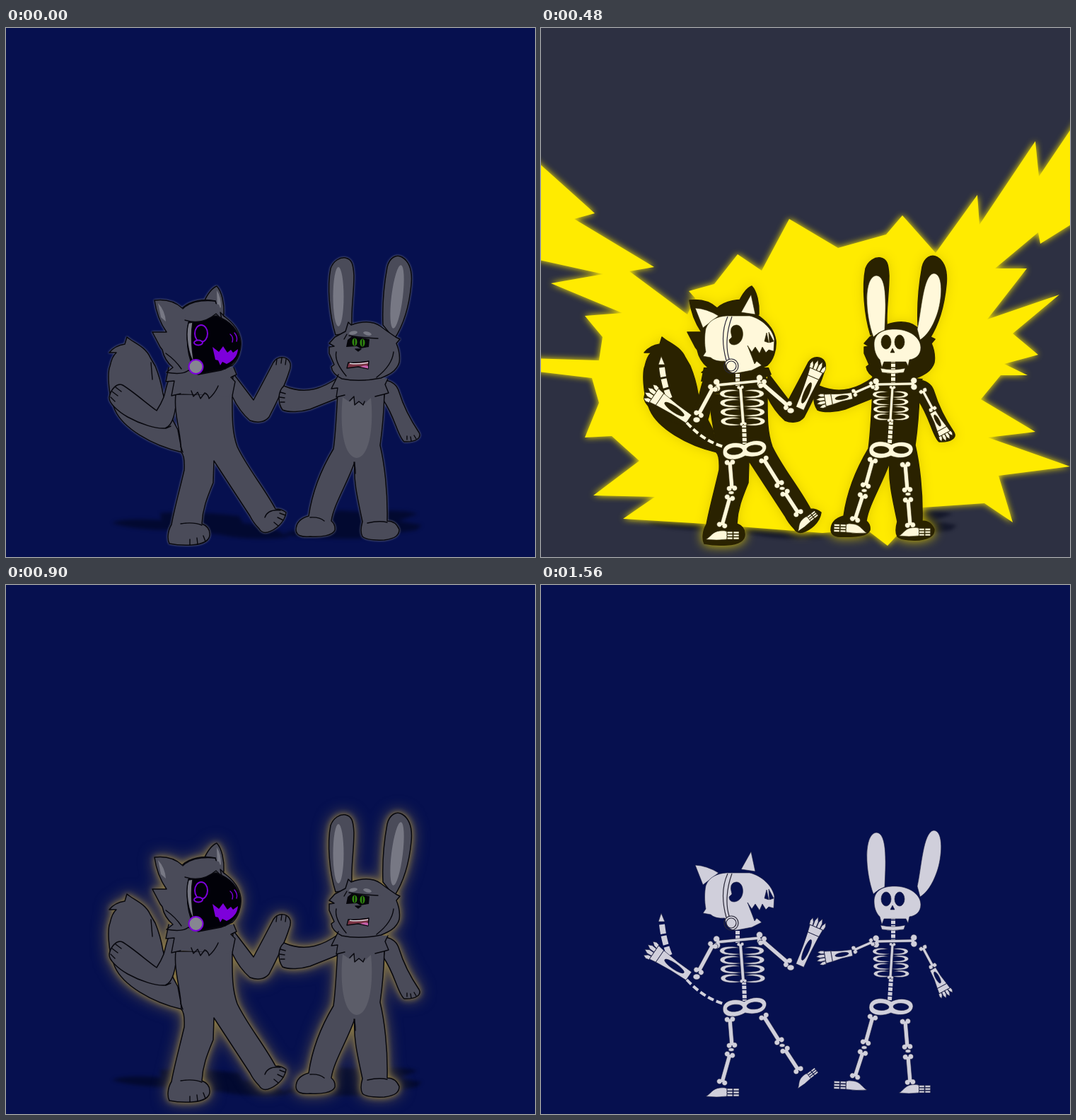
An HTML page that plays this animation: 748 px wide and 748 px high, repeating every 1.62 s.

```html
<!DOCTYPE html>
<html lang="en">
<head>
<meta charset="utf-8">
<title>Shocking handshake</title>
<style>
html, body { margin: 0; height: 100%; overflow: hidden; background: #06104f; }
svg { display: block; width: 748px; height: 748px; background: #06104f; }
.burst, .skel #shadow, .skel #bodies, #bones, #details { display: none; }
.burst { fill: #ffeb00; filter: drop-shadow(0 0 5px #ffeb00); }
.a, .b { background: #2d3042; }
.a #burstA, .b #burstB { display: inline; }
.calm #details, .glow #details { display: inline; }
.white #bones, .dark #bones, .shade #bones, .skel #bones { display: inline; }

.calm, .glow { --body: #4a4b59; --line: #07070d; }
.white { --body: #fff8da; --line: #fff8da; --bone: #2a2200; --edge: #fff8da; }
.dark { --body: #2a2200; --line: #2a2200; --bone: #fff8da; --edge: #2a2200; }
.shade { --body: #2a2200; --line: #2a2200; --bone: #2a2200; --edge: #5d5433; }
.skel { --bone: #d0cfdb; --edge: #15183c; }

#bodies { fill: var(--body); stroke: var(--line); stroke-width: 1.5; stroke-linejoin: round; }
.calm #bodies { filter: drop-shadow(0 0 1.5px #777a86); }
.glow #bodies { filter: drop-shadow(0 0 4px #8f7c45) drop-shadow(0 0 10px #6b6046); }
.a #bodies, .b #bodies { filter: drop-shadow(0 0 8px #dfc900); }
#bodies .fur { stroke: none; }
#details { fill: none; stroke: #07070d; stroke-width: 1.4; stroke-linecap: round; stroke-linejoin: round; }
#bones { fill: var(--bone); stroke: var(--edge); stroke-width: .6; fill-rule: evenodd; }
#bones .links { fill: none; stroke: var(--bone); }
#bones .seam { fill: none; stroke: var(--edge); stroke-width: 1.2; }
.dark #bones .seam, .skel #bones .seam { stroke: #2a2838; }
</style>
</head>
<body>
<svg id="stage" class="calm" viewBox="0 0 748 748">
  <path id="shadow" fill="#000418" opacity=".55" style="filter:blur(2.5px)" d="M150 700Q165 692 220 696L218 686Q260 682 330 690L335 700Q380 704 400 720Q350 726 300 716L240 710Q180 710 150 700ZM390 716Q420 722 500 722L580 710 588 703 555 697 582 687Q560 680 500 684L470 682 440 700Z"/>

  <path id="burstA" class="burst" d="M-20 176L76 262 47 270 160 338 125 344 207 405 218 382 209 372 245 362 278 320 312 343 351 270 420 311 488 292 511 265 558 318 617 236 620 278 699 160 704 210 770 112V265L706 305 703 289 642 340H687L631 412 733 377 667 432 703 462 655 475 688 491H650L622 525 699 571 632 579 748 620 647 633 667 699 627 672 540 678 490 732 460 709 398 714 215 700 116 694 161 663 74 661 139 612 100 577 62 579 82 530 72 495-20 484V467L82 470 87 437 62 407 115 403 14 361 88 348-20 324Z"/>
  <path id="burstB" class="burst" d="M-20 173L55 237 36 251 135 302 108 318 196 382 215 380 260 289 320 369 405 361 424 338 450 366 495 376 529 340 548 360 575 350 606 318 593 297 680 222 672 203 770 85V232L708 263 724 297 630 345 640 374 611 406 618 430 742 438 652 472 712 470 659 522 671 558 655 549 665 573 721 604 627 612 640 640 684 653 571 671 590 748 530 698 470 692 405 722 330 697 300 755H270L230 728 187 710 205 704 69 730 118 628 32 558 143 518 46 486 140 484 155 462 108 390 143 387 36 358 96 339-20 318Z"/>

  <g id="bodies">
    <!-- fox -->
    <path d="M249 600C205 590 165 565 154 540C143 515 144 485 147 478Q150 464 156 459L146 459Q154 449 168 447L171 437C180 445 197 450 204 466L211 478C218 495 220 505 222 517Q229 543 243 568Z"/>
    <path d="M238 488C229 492 227 508 223 522Q219 532 213 541C200 532 180 514 165 505C157 501 148 511 146 522C145 530 158 542 172 550C190 560 212 567 225 566C236 562 240 545 242 515Z"/>
    <path d="M321 488L350 526Q364 500 378 473C384 463 397 464 401 472Q404 477 400 487C395 503 385 525 372 550C365 559 353 558 345 555Q330 542 320 521Z"/>
    <path d="M240 518C237 545 247 570 248 600Q253 605 252 625C245 655 238 680 234 702C228 712 228 724 231 729Q245 732 263 731C280 730 289 724 288 715C288 707 282 703 277 701C278 680 284 665 293 643L294 612 345 690Q350 700 358 708Q362 715 370 713C380 710 394 700 396 685Q390 680 381 680C365 650 340 620 327 592C319 570 320 545 320 518Z"/>
    <path class="fur" d="M230 480L226 500 238 499 234 520 250 517 320 521 324 500 318 494 326 490 322 480Z"/>
    <path d="M279 389Q288 369 298 365C305 372 309 390 308 405L295 408Z"/>
    <path d="M210 385Q234 382 249 396C260 386 280 382 296 386L301 402 309 408C320 416 330 428 332 442C333 456 328 470 320 477L304 484 272 490 258 484Q250 491 227 487L236 480Q224 470 221 455L218 451 207 430 227 430C218 417 212 400 210 385Z"/>
    <!-- rabbit -->
    <path d="M466 434C457 405 454 365 459 340C463 329 472 324 480 325C489 327 491 333 492 350C492 375 488 398 489 418L483 432Z"/>
    <path d="M533 420C532 395 534 365 539 338C542 325 552 319 560 324C570 330 575 343 573 363C570 395 562 420 549 440Z"/>
    <path d="M470 494C450 508 425 520 393 506C384 514 384 530 391 540C400 544 417 543 430 539L470 523Z"/>
    <path d="M537 498Q552 501 556 515C562 535 572 554 584 572C588 579 580 586 563 585C554 578 550 550 534 527Z"/>
    <path d="M469 515C467 550 466 575 463 595C445 625 433 655 428 690Q410 695 410 710Q411 721 430 719C445 720 462 718 465 710Q466 702 460 697C463 675 482 645 493 614C491 640 497 665 504 698Q500 712 504 719Q510 725 535 724C551 722 556 717 556 709Q551 697 539 697C540 655 535 615 529 590Q534 555 535 517Z"/>
    <path class="fur" d="M470 490L460 510 469 509 467 522 479 519 486 529 492 523 493 533 499 529 505 533 522 521 534 518 541 516 536 504 540 496Z"/>
    <path d="M484 416L488 420C505 414 520 415 530 422L538 428 551 437 557 440 552 446Q558 460 556 473C552 486 540 491 530 495Q500 501 475 496Q461 489 460 479L464 476 457 460V451L464 450 457 446 465 437 480 429Z"/>
  </g>

  <g id="details">
    <path d="M230 480L226 500 238 499 234 520 247 517M322 480L326 490 318 494 324 500 320 520M262 513L265 521 271 515 275 524 281 516Q286 518 287 524Q296 516 300 506M205 473L207 497M226 460Q240 470 248 482M150 514L158 520M155 508L163 514M148 522L154 528M383 468L382 476M390 466L389 474M396 468L395 476M247 701Q265 698 277 703M260 723V731M270 721L271 730M279 718L282 726M366 692Q370 680 388 682M384 692L392 696M379 699L385 704M387 686L395 689M226 566L233 563M247 592L250 600"/>
    <path d="M215 389Q225 400 226 415L219 409ZM298 371Q304 380 304 395L299 399Z" fill="#777884" stroke="none"/>
    <path d="M258 416Q252 455 266 483L272 489 310 482Q331 470 332 447Q328 418 297 407Z" fill="#010108"/>
    <path d="M258 417C253 435 258 462 266 474Q260 440 264 416Z" fill="#777884"/>
    <path d="M253 413Q277 421 297 404L307 407 301 391 280 387 255 397Z" fill="#4a4b59" stroke="none"/>
    <path d="M250 397Q264 383 296 386M253 413Q277 421 297 404L305 412 303 402 309 408"/>
    <g stroke="#7d00db" stroke-width="2">
      <ellipse cx="276" cy="432" rx="9" ry="12"/><ellipse cx="272" cy="445" rx="6" ry="3.5" fill="#010108"/>
      <path d="M317 433Q322 437 320 444M323 431Q328 437 326 443" stroke-width="1.4"/>
      <path d="M292 451L301 458 307 450 313 459 318 455 321 459 328 454Q327 468 312 475L306 472 303 477 300 470 296 469Z" fill="#7d00db" stroke="none"/>
      <circle cx="268.5" cy="479" r="10" fill="#868691"/>
    </g>

    <g fill="#777884" stroke="none">
      <ellipse cx="470" cy="380" rx="7.5" ry="42"/>
      <ellipse cx="553" cy="380" rx="8" ry="45" transform="rotate(7 553 380)"/>
      <ellipse cx="491" cy="431" rx="6" ry="2.5" transform="rotate(-10 491 431)"/>
      <ellipse cx="511" cy="432" rx="6" ry="2.5" transform="rotate(15 511 432)"/>
      <path d="M476 522L486 529 492 523 493 533 499 529 505 533 516 523C520 560 515 606 496 608C476 606 472 560 476 522Z" fill="#5c5d69"/>
    </g>
    <path d="M470 490L460 510 469 509 467 522 479 519M486 527L492 521 493 533 499 528 505 533 507 528M522 521L534 518 541 516 536 504 540 496M467 458Q464 472 481 492M548 458Q546 477 524 494M485 435Q505 438 526 439M478 440L482 433M388 515L395 517M387 522L394 523M388 529L394 529M567 582V577M573 584L572 578M580 581L577 576M430 692Q443 691 450 697M511 700Q528 696 539 699M492 614Q494 620 494 630"/>
    <path d="M481 451L483 441 489 436 514 440 513 451 501 453 496 450Z" fill="#05050a" stroke="none"/>
    <g fill="#30880f" stroke="none"><ellipse cx="493" cy="444" rx="3.5" ry="5.5"/><ellipse cx="504" cy="445" rx="3.5" ry="5.5"/></g>
    <path d="M493 440V448M504 441V449M494 454H502L498 457Z" fill="#05050a"/>
    <path d="M484 473Q498 474 513 471L512 482 498 479 482 481Z" fill="#7b3444"/>
    <path d="M486 473.500Q498 475 512 472.500V474Q498 476.500 486 475Z" fill="#ddd8de" stroke="none"/>
    <path d="M501 479Q507 476 512 478V481.500Z" fill="#c861ae" stroke="none"/>
  </g>

  <g id="bones"></g>
</svg>
<script>
const stage = document.getElementById('stage');
const path = (d, attrs = '') => `<path d="${d}" ${attrs}/>`;
const oval = (x, y, rx, ry) => `M${x - rx} ${y}a${rx} ${ry} 0 1 0 ${2 * rx} 0a${rx} ${ry} 0 1 0 ${-2 * rx} 0z`;

// Draws along the line from (x1,y1) to (x2,y2); shape(length) works on the local x axis.
const along = (x1, y1, x2, y2, shape) => {
  const angle = Math.atan2(y2 - y1, x2 - x1) * 180 / Math.PI;
  return path(shape(Math.hypot(x2 - x1, y2 - y1)), `transform="translate(${x1} ${y1}) rotate(${angle})"`);
};
const bone = (x1, y1, x2, y2, w = 3, r = 3.8) => along(x1, y1, x2, y2, n =>
  `M${r} ${-w}H${n - r}a${r} ${r} 0 1 1 ${r} ${w}a${r} ${r} 0 1 1 ${-r} ${w}H${r}a${r} ${r} 0 1 1 ${-r} ${-w}a${r} ${r} 0 1 1 ${r} ${-w}z`);

// Forearm from wrist to elbow, with a palm and fanned fingers beyond the wrist.
const forearm = (x1, y1, x2, y2, a, b, reach) => along(x1, y1, x2, y2, n => {
  const palm = -reach * .45;
  let d = `M0 ${-a}Q${n / 2} ${-b} ${n} ${-b}V${b}Q${n / 2} ${b} 0 ${a}z` + oval(n * .5, 0, n * .33, b * .6);
  d += `M0 ${-a}L${palm} ${-a * 1.15}V${a * 1.15}L0 ${a}z`;
  for (let i = 0; i < 4; i++) {
    const y = (i - 1.5) * a * .65, tip = -reach * (i % 3 ? 1.05 : .9);
    d += `M${palm} ${y - a * .28}L${tip * .75} ${y * 1.1 - a * .3}L${tip} ${y * 1.2}L${tip * .75} ${y * 1.1 + a * .3}L${palm} ${y + a * .28}z`;
  }
  return d;
});

const ribs = (x, y, scale, rows, gap) => {
  const half = 'M-1 5C-20 9-33 5-33 0C-33-6-15-8-4-4C-18-4-27-2-26 1C-24 4-12 4-1 5Z';
  let out = '';
  for (let i = 0; i < rows; i++)
    for (const side of [1, -1])
      out += path(half, `transform="translate(${x + i * .5} ${y + i * gap}) scale(${side * scale} ${scale})"`);
  return out;
};

const pelvis = (x, y, tilt) => path(
  'M0-8C12-15 31-13 31-2C30 9 15 13 0 8C-15 15-31 12-31 1C-31-12-13-15 0-8Z' + oval(-14, 0, 11, 5) + oval(14, -1, 11, 5),
  `transform="translate(${x} ${y}) rotate(${tilt})"`);

const foot = (x, y, turn, flip = 1, size = 1) => {
  let d = 'M0 0C7-3 9-11 20-12Q27-13 30-11V0Q15 2 0 0Z';
  for (let i = 0; i < 3; i++) d += `M30 ${-11 + i * 4}h8v3h-8zM39 ${-11 + i * 4}h8v3h-8z`;
  return path(d, `transform="translate(${x} ${y}) rotate(${turn}) scale(${flip * size} ${size})"`);
};

const links = (d, width, dash) => path(d, `class="links" stroke-width="${width}" stroke-dasharray="${dash}"`);
const seam = d => path(d, 'class="seam"');

const fox =
  path('M218 396Q235 397 251 407L229 424ZM297 377L303 405 283 402Z') +
  path('M233 425C238 412 250 408 262 407H295C312 411 327 425 330 440L329 457 322 455 318 459 313 451 309 460 303 451 298 458 292 449L299 467 302 475 305 471 312 477 298 484 277 488C268 489 262 484 260 471Q246 472 240 466L229 464 233 458C231 447 231 435 233 425Z' +
    'M276 420C289 420 289 447 273 448Q266 448 266 441L270 437Q265 421 276 420ZM319 431L316 443 322 445ZM322 430L329 443 323 445Z') +
  seam('M264 408C254 430 257 452 262 470M270 408C262 430 261 452 266 468' + oval(269, 478, 10, 10) + oval(269, 478, 7, 7)) +
  path('M170 464L166 476 175 476Z') +
  links('M171 480Q174 505 182 524', 8, '13 3') +
  links('M206 558Q230 584 258 592', 4, '9 4') +
  links('M278 489V506M287 560L288 588', 6, '5 1.5') +
  ribs(284, 517, .95, 4, 13) +
  bone(282, 508, 286, 560, 2.3, 2.5) +
  bone(248, 505, 310, 499, 2.2, 4.5) +
  bone(243, 509, 223, 546) + path(oval(220, 554, 5, 4)) +
  forearm(168, 525, 209, 553, 10, 7, 22) +
  bone(313, 503, 349, 534) + path(oval(353, 541, 5, 4)) +
  forearm(385, 494, 366, 538, 8.5, 6, 24) +
  pelvis(288, 597, -5) +
  bone(267, 614, 270, 651) + path(oval(269, 657, 4, 2.5)) + bone(267, 664, 256, 703) +
  bone(315, 610, 337, 645) + path(oval(341, 651, 4, 2.5)) + bone(345, 657, 364, 686) +
  foot(233, 723, 0) + foot(363, 712, -38, 1, .78);

const rabbit =
  path('M470 437C458 405 456 352 474 350C491 350 487 400 486 427Q477 430 470 437ZM532 426C538 400 540 350 555 347C570 347 567 385 560 405C553 425 545 435 536 441Z') +
  links('M498 468V510M495 556L493 587', 6, '5 1.5') +
  path('M471 447C471 430 487 425 503 426C522 427 537 438 537 452C537 462 530 468 521 469L519 478 516 472H485L482 480 479 469C473 463 471 455 471 447Z' +
    oval(488, 444, 7, 10) + oval(507, 444, 7, 10) + 'M497 453L494 459H500Z') +
  path('M480 481Q498 485 515 481L513 487Q498 490 482 487Z') +
  ribs(494, 518, .76, 4, 10.5) +
  bone(497, 508, 494, 555, 2, 2.3) +
  bone(473, 504, 528, 503, 2, 4.5) +
  bone(468, 505, 443, 516, 2, 3) + forearm(411, 525, 440, 520, 7.5, 4.5, 21) +
  bone(540, 513, 554, 539, 2, 3) + forearm(567, 567, 554, 543, 7.5, 4.5, 17) +
  pelvis(495, 597, 2) +
  bone(469, 611, 459, 647) + path(oval(457, 654, 4, 2.5)) + bone(455, 661, 444, 695) +
  bone(515, 617, 518, 653) + path(oval(519, 659, 4, 2.5)) + bone(519, 667, 522, 703) +
  foot(461, 714, 2, -1) + foot(506, 718, 0, 1, .95);

document.getElementById('bones').innerHTML = fox + rabbit;

const STEP = 60, LOOP = 1620;
const flashes = ['calm', 'shade b', 'skel', 'white a', 'dark b', 'glow', 'skel', 'shade b', 'dark a', 'white b'];
function draw() {
  const step = Math.floor(performance.now() % LOOP / STEP);
  stage.setAttribute('class', flashes[step % flashes.length]);
  requestAnimationFrame(draw);
}
draw();
</script>
</body>
</html>
```
